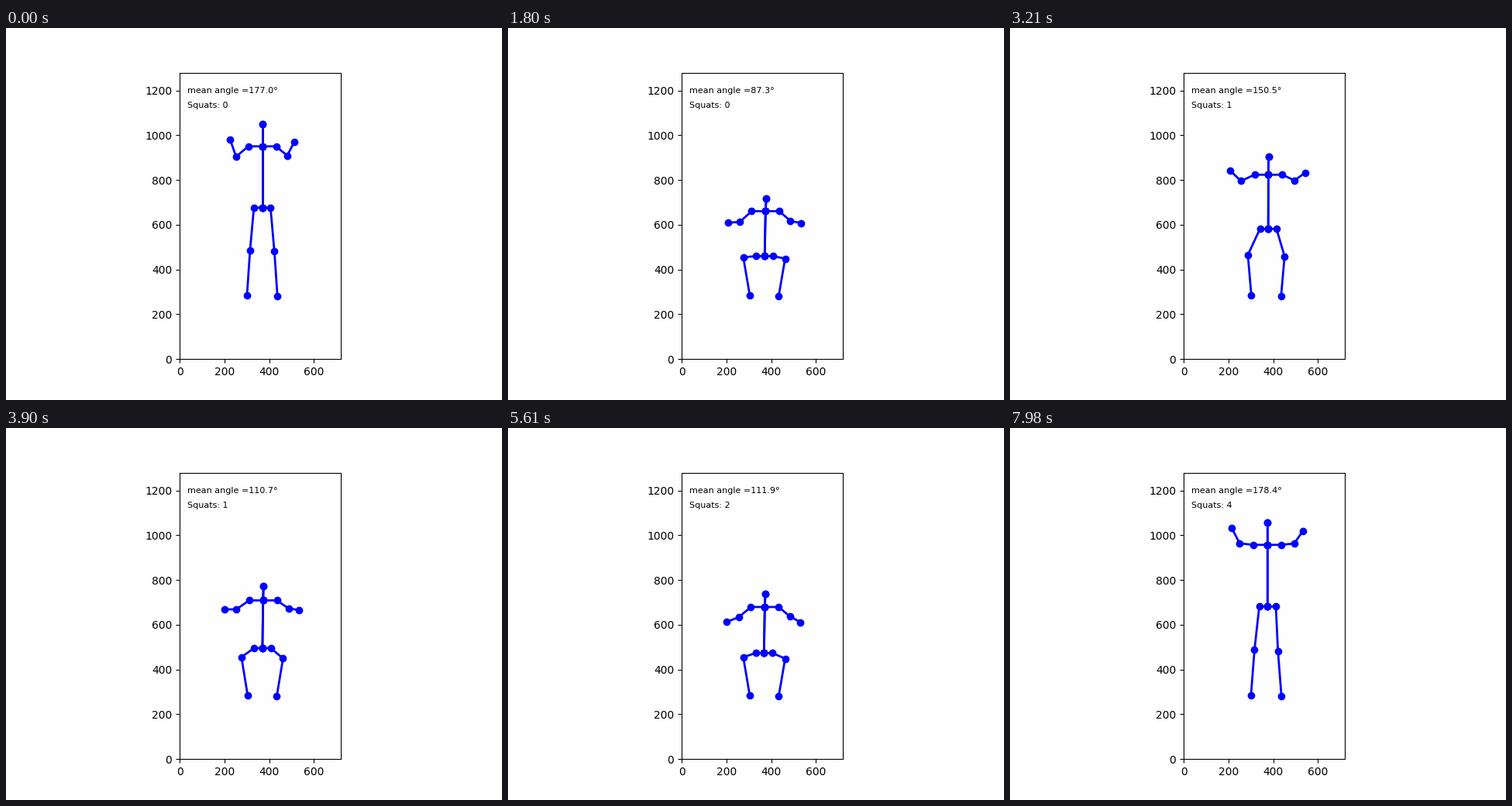
Write a matplotlib script that moves like this. It is 640 by 480 pixels and loops after 8 s.

```python
import numpy as np
import matplotlib.pyplot as plt
from matplotlib.animation import FuncAnimation

LOOP, TICK, STEP = 8000, 20, 30   # ms: loop, timer tick, time between poses
LOW, HIGH = 460, 678              # hip height in a full squat and upright

# hip height, shown knee angle, hip x, upper arm angle, forearm angle
ready = np.array([677, 177.0, 369, -40, 67])
squat = np.array([460, 87.3, 371, -42, -7])
sink = np.array([582, 150.5, 378, -25, 40])
stand = np.array([675, 178.9, 373, 4, 67])
rise = np.array([474, 111.9, 368, -40, -25])
drop = np.array([554, 148.8, 369, -28, 2])
tall = np.array([682, 178.4, 375, 6, 59])
low = (squat + rise) / 2

KEYS = {0: ready, 870: ready, 1800: squat, 2730: stand, 3210: sink, 3670: low,
        4650: stand, 5490: low, 5610: rise, 6400: tall, 6960: drop, 7270: low,
        7980: tall}
times = np.array(list(KEYS), float)
poses = np.array(list(KEYS.values()))


def monotone_slopes(t, p):
    d = np.diff(p, axis=0) / np.diff(t)[:, None]
    a, b = d[:-1], d[1:]
    same = a * b > 0
    m = np.zeros_like(p)
    m[1:-1] = np.where(same, 2 * a * b / np.where(same, a + b, 1), 0)
    return m


slopes = monotone_slopes(times, poses)


def pose_at(ms):
    k = min(np.searchsorted(times, ms, side="right") - 1, len(times) - 2)
    h = times[k + 1] - times[k]
    u = (ms - times[k]) / h
    blend = u * u * (3 - 2 * u)
    return ((1 - blend) * poses[k] + blend * poses[k + 1]
            + h * u * (1 - u) ** 2 * slopes[k] - h * u * u * (1 - u) * slopes[k + 1])


def count_squats(angles):
    counts, total, down = [], 0, False
    for a in angles:
        if a < 120:
            down = True
        elif down and a > 160:
            down = False
            total += 1
        counts.append(total)
    return counts


track = [pose_at(ms) for ms in range(0, LOOP, STEP)]
squats = count_squats([p[1] for p in track])


def arm_part(side, length, degrees):
    a = np.radians(degrees)
    # a segment seen more from the front looks longer; the left arm reaches further
    size = (length + (80 - length) * np.sin(a) ** 2) * (1 - 0.05 * side)
    return size * np.array([side * np.cos(a), np.sin(a)])


def limbs(p):
    """Polylines of the figure: trunk, arm and leg for each side."""
    hip_y, _, hip_x, upper, fore = p
    up = (hip_y - LOW) / (HIGH - LOW)
    lean = (1 - up) ** 2
    hip = np.array([hip_x, hip_y])
    neck = hip + (4 * lean, 201 + 73 * up)
    head = neck + (3 * lean, 57 + 42 * up)
    stance = 68 - 3.5 * (1 - up)
    lines = []
    for side in (-1, 1):
        shoulder = neck + (side * 62, 0)
        elbow = shoulder + arm_part(side, 60, upper)
        wrist = elbow + arm_part(side, 50, fore - 4 * side)
        ankle = (369 + side * stance, 283 - 2 * side)
        knee = (369 + side * (stance + 29 - 43 * up ** 2), 452 + 32 * up ** 2 - 3 * side)
        lines += [[head, neck, hip], [neck, shoulder, elbow, wrist],
                  [hip, hip + (side * 37, 0), knee, ankle]]
    return lines


fig, ax = plt.subplots(figsize=(6.4, 4.8), dpi=100, facecolor="#fefefe")
ax.set(aspect="equal", xlim=(0, 720), ylim=(0, 1280), facecolor="#fefefe")
bones = [ax.plot([], [], "bo-", lw=2)[0] for _ in range(6)]
angle_text, count_text = (
    ax.text(0.05, y, "", transform=ax.transAxes, fontsize=8, va="top")
    for y in (0.95, 0.90))


def draw(i):
    n = min((i * TICK + TICK // 2) // STEP, len(track) - 1)
    for bone, pts in zip(bones, limbs(track[n])):
        bone.set_data(*np.array(pts).T)
    angle_text.set_text(f"mean angle ={track[n][1]:.1f}°")
    count_text.set_text(f"Squats: {squats[n]}")
    return [*bones, angle_text, count_text]


anim = FuncAnimation(fig, draw, frames=LOOP // TICK, interval=TICK,
                     init_func=lambda: draw(0), repeat=True, repeat_delay=0)
plt.show()
```
